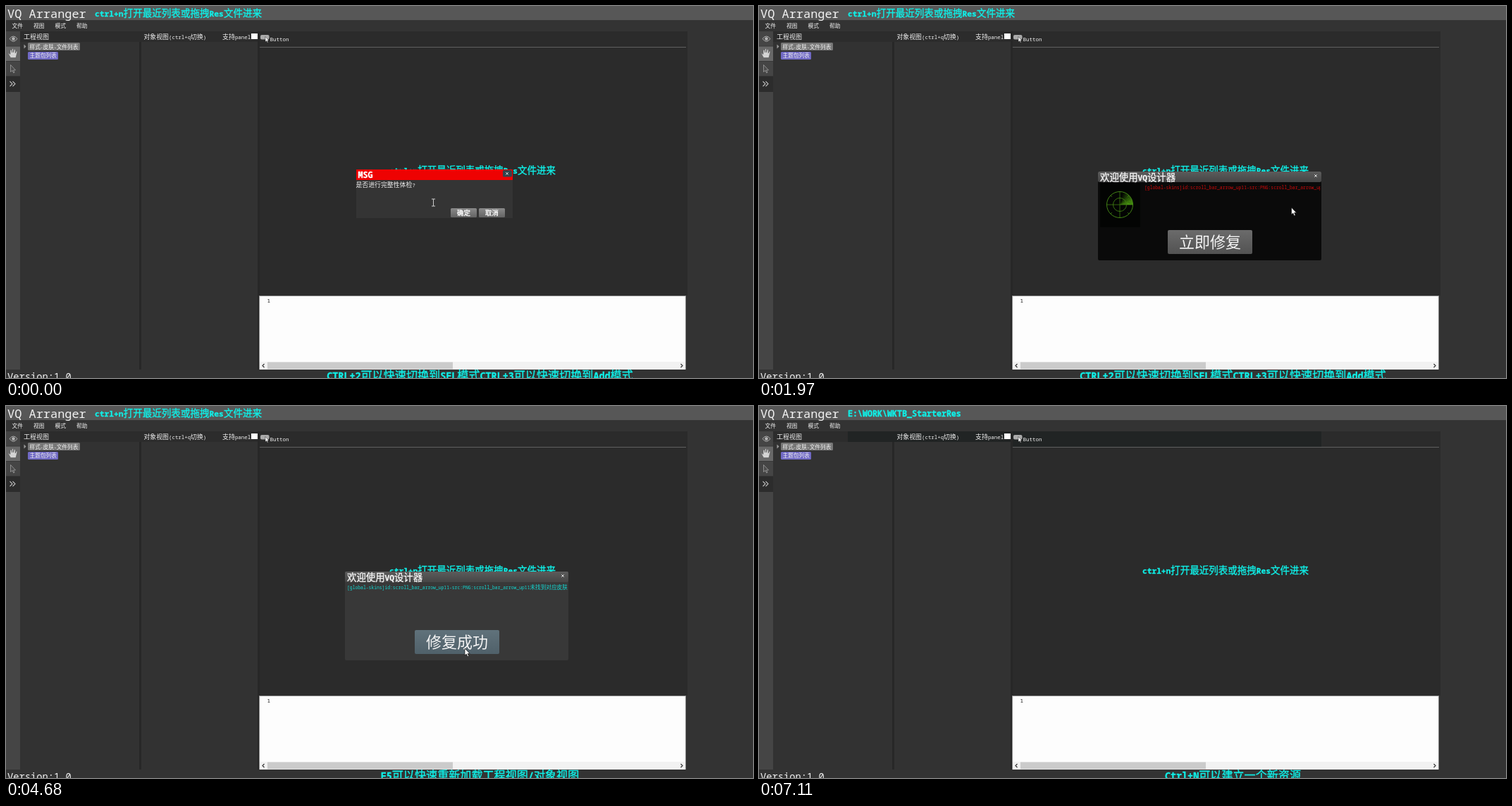
Write an HTML page that moves like this. It is 1060 px wide and 528 px high and loops after 7700 ms.

```html
<!DOCTYPE html>
<html lang="zh-CN">
<head>
<meta charset="utf-8">
<title>Health check</title>
<style>
html, body { margin: 0; width: 100%; height: 100%; overflow: hidden; background: #333; }
svg { display: block; width: 1060px; height: 528px; }
text { font-family: "Noto Sans CJK SC", "Noto Sans CJK", sans-serif; white-space: pre; }
.m { font-family: "Noto Sans Mono", "Liberation Mono", monospace; }
.l { font-weight: 300; }
.mid { text-anchor: middle; }
.b { stroke-width: .35px; }
.b .m { font-weight: 600; }
</style>
</head>
<body>
<svg id="stage" viewBox="0 0 1060 528"></svg>
<script>
const LOOP = 7700;
const STEP = 134;   // screen refresh interval
const LEAD = 40;    // refresh phase
const SPIN = 0.305; // radar, degrees per ms
const CYAN = '#0ff0e8';

// Full-width glyphs take one em, half-width ones half an em.
const runs = s => s.replace(/[\x20-\x7e]+|[^\x20-\x7e]+/g, r =>
  r.charCodeAt(0) < 127 ? `<tspan class="m" font-size=".8333em">${r}</tspan>` : r);
const text = (x, y, size, s, fill = '#f2f2f2', cls = '', id = '') =>
  `<text x="${x}" y="${y}" font-size="${size}" fill="${fill}" class="${cls}" id="${id}"` +
  `${/\bb\b/.test(cls) ? ` stroke="${fill}"` : ''}>${runs(s)}</text>`;
const rect = (x, y, w, h, fill, attrs = '') =>
  `<rect x="${x}" y="${y}" width="${w}" height="${h}" fill="${fill}" ${attrs}/>`;
const line = (d, stroke, width = 1) =>
  `<path d="${d}" fill="none" stroke="${stroke}" stroke-width="${width}"/>`;
const group = (id, body) => `<g id="${id}">${body}</g>`;
const grad = (id, a, b) =>
  `<linearGradient id="${id}" x2="0" y2="1"><stop stop-color="${a}"/><stop offset="1" stop-color="${b}"/></linearGradient>`;

const defs = '<defs>' +
  grad('head', '#5c5c5c', '#454545') +
  grad('normal', '#6b6b6b', '#525252') + grad('hover', '#918f90', '#a2a0a1') +
  grad('done', '#60727b', '#50616a') + grad('press', '#71858f', '#60737d') +
  grad('small', '#8a8a8a', '#646464') + grad('smallHover', '#aaa', '#888') +
  '<clipPath id="log"><rect x="482" y="250" width="314.5" height="14"/></clipPath></defs>';

const toolbar =
  rect(0, 36, 20, 480, '#454545') + rect(0, 57, 20, 21, '#686868') +
  rect(0, 100, 20, 22, '#2c2c2c') + line('M0 57H20M0 78.5H20M0 99.5H20', '#383838') +
  line('M5 46.5Q10.5 39.5 16 46.5Q10.5 54 5 46.5Z', '#b4b4b4') +
  '<circle cx="10.5" cy="46.5" r="2.3" fill="#b4b4b4"/>' +
  '<path d="M6.5 73.5L3.5 68Q4 66.5 6 68.5V62.5Q7 61.5 8 62.5L8.6 66V61Q9.6 60 10.5 61V66L11.7 61.5Q13 61 13.3 62.2L13.2 67L14.6 64Q16 63.5 16 65L14 73.5Z" fill="#d4d4d4" stroke="#444" stroke-width=".5"/>' +
  '<path d="M6.5 83.5V93.5L9 91.5L10.7 95L12 94.3L10.5 91H13.5Z" fill="#4c4c4c" stroke="#a0a0a0" stroke-width=".8"/>' +
  line('M5.5 107L9 110.5L5.5 114M9.5 107L13 110.5L9.5 114', '#bbb', 1.1);

const hint = 'ctrl+n打开最近列表或拖拽Res文件进来';
const frame =
  rect(0, 0, 1060, 528, '#333') + rect(0, 0, 1060, 20, '#575757') +
  text(2, 17, 20.35, 'VQ Arranger') +
  ['文件', '视图', '模式', '帮助'].map((s, i) => text(8.5 + i * 30.5, 30.7, 7.8, s)).join('') +
  toolbar +
  rect(20, 36, 947, 480, '#323232') + rect(20, 36, 337, 15, '#2c2c2c') +
  rect(189, 51, 3, 465, '#272727') +
  rect(357, 36, 3, 480, '#272727') + rect(360, 36, 607, 375, '#2b2b2b') +
  group('shade', rect(126, 36, 231, 15, '#212424') + rect(360, 36, 438, 22, '#212424')) +
  rect(360, 58, 605, 1, '#606060') +
  text(25, 46.7, 9, '工程视图') + text(195.5, 46.7, 8.9, '对象视图(ctrl+q切换)') +
  text(307, 46.7, 8.95, '支持panel') +
  rect(348, 39, 9, 8, '#fff') +
  rect(361, 41, 12.5, 6.5, '#aaa', 'rx="2"') +
  '<path d="M368 43.5V51L369.7 49.5L371 52L372 51.5L371 49H373Z" fill="#fff" stroke="#222" stroke-width=".5"/>' +
  text(374.5, 50, 9, 'Button') +
  '<path d="M25.5 54.5L28.5 57.5L25.5 60.5Z" fill="#999"/>' +
  rect(31, 52, 74, 11, '#777', 'rx="1.5"') + text(33.5, 60.5, 7.65, '样式-皮肤-文件列表') +
  rect(31, 65, 43, 11, '#7069c4', 'rx="1.5"') + text(33.5, 73.2, 7.7, '主题包列表') +
  rect(359, 411, 606, 105, '#8c8c8c') + rect(360, 412, 604, 104, '#fdfdfd') +
  text(370.5, 420.7, 9.2, '1', '#111') +
  rect(360, 505, 604, 11, '#f2f2f2') + rect(371, 505.5, 263, 9.8, '#cbcbcb') +
  line('M366.5 508L364 510.5L366.5 513M957.5 508L960 510.5L957.5 513', '#333', 1.2) +
  text(2, 530.5, 16.5, 'Version:1.0') +
  text(662, 238.3, 13.5, hint, CYAN, 'b mid') +
  text(126, 15, 13.55, hint, CYAN, 'b', 'hint') +
  text(126, 15, 14, 'E:\\WORK\\WKTB_StarterRes', CYAN, 'b', 'path') +
  ['CTRL+2可以快速切换到SEL模式CTRL+3可以快速切换到Add模式',
   'F5可以快速重新加载工程视图/对象视图',
   'Ctrl+N可以建立一个新资源'].map((s, i) => text(672.5, 530, 16.1, s, CYAN, 'b mid', 'tip' + i)).join('');

const cross = (x, y) => line(`M${x - 1.7} ${y - 1.7}l3.4 3.4m0 -3.4l-3.4 3.4`, '#e8e8e8');
const smallButton = (id, x, s) =>
  rect(x, 287, 37, 13, 'url(#small)', `rx="1.5" id="${id}"`) +
  text(x + 18.5, 297, 9.4, s, '#fff', 'b mid');
const msg =
  rect(497, 232, 222, 69, '#343434') + rect(497, 232, 222, 15, '#ee0202') +
  text(499.5, 244, 14, 'MSG', '#fff', 'b') +
  rect(705, 233, 13, 9.5, '#34444c', 'rx="1.5"') + cross(711, 237.8) +
  text(496.5, 257, 8.9, '是否进行完整性体检?') +
  smallButton('ok', 631, '确定') + smallButton('cancel', 671, '取消');

const dialog = (w, h, body, content) =>
  rect(481, 235, w, h, body, 'rx="2"') + rect(481, 235, w, 15, 'url(#head)', 'rx="2"') +
  text(484, 247.5, 13.4, '欢迎使用VQ设计器', '#f4f4f4', 'b') +
  cross(473 + w, 241) + content;
const button = (id, x, y, s) =>
  rect(x, y, 120, 34, 'url(#normal)', `rx="2" id="${id}"`) +
  text(x + 60, y + 25.2, 22, s, '#f4f4f4', 'l mid');

// Sweep: thin slices fading away behind the leading edge.
const polar = (r, deg) => {
  const a = deg * Math.PI / 180;
  return `${(r * Math.cos(a)).toFixed(2)} ${(r * Math.sin(a)).toFixed(2)}`;
};
const slices = Array.from({ length: 15 }, (_, i) =>
  `<path d="M0 0L${polar(18.5, -5 * i - 5.3)}A18.5 18.5 0 0 1 ${polar(18.5, -5 * i)}Z" fill="#58b414" opacity="${0.85 * (1 - i / 15)}"/>`).join('');
const ring = (r, stroke) => `<circle r="${r}" fill="none" stroke="${stroke}" stroke-width=".9"/>`;
const radar = rect(484, 251, 57, 63, '#030403') +
  '<g transform="translate(512 282)">' + group('sweep', slices) +
  line('M-18.5 0H18.5M0 -18.5V18.5', '#3f7d12', .8) +
  line('M-13 -13l2 2M13 -13l-2 2M-13 13l2 -2M13 13l-2 -2', '#3f7d12', .8) +
  ring(18.5, '#4a9118') + ring(9.5, '#3f7d12') + '</g>';

const issue = '[global-skins]id:scroll_bar_arrow_up11-src:PNG:scroll_bar_arrow_up11未找到对应皮肤';
const log = (x, fill) => `<g clip-path="url(#log)">${text(x, 259.7, 7.64, issue, fill)}</g>`;

document.getElementById('stage').innerHTML = defs + frame +
  group('msg', msg) +
  group('welcome', dialog(254, 63, '#383838', button('check', 548, 255, '立即体检'))) +
  group('scan', dialog(317, 126, '#0a0a0a', radar + log(547, '#d00808') + button('repair', 580, 318, '立即修复'))) +
  group('fixed', dialog(317, 126, '#383838', log(484, '#12d8d2') + button('success', 580, 318, '修复成功'))) +
  group('beam', line('M-2.5 -5H2.5M0 -5V5M-2.5 5H2.5', '#ccc')) +
  group('arrow', '<path d="M0 0V10L2.3 8L4 11.8L5.7 11L4.1 7.4H7.2Z" fill="#fff" stroke="#111" stroke-width=".7"/>');

const el = id => document.getElementById(id);
const fill = (id, paint) => el(id).setAttribute('fill', `url(#${paint})`);

// When each part is on screen.
const spans = {
  msg: [0, 640], welcome: [640, 1460], scan: [1460, 4560], fixed: [4560, 6290],
  hint: [0, 6290], path: [6290, LOOP], shade: [6290, LOOP],
  tip0: [0, 3200], tip1: [3200, 7110], tip2: [7110, LOOP],
  beam: [0, 270], arrow: [270, 7110]
};

// Mouse moves: start, duration, destination.
const home = [606.5, 279];
const moves = [
  [150, 240, 658, 293],   // confirm
  [940, 360, 619, 276],   // check
  [1460, 480, 755.5, 286],
  [1970, 430, 844, 286],
  [2520, 620, 645, 339],  // repair
  [3600, 340, 697, 316],
  [3960, 150, 684.5, 316],
  [4140, 260, 651, 344],
  [4700, 340, 770, 322],
  [5070, 230, 651, 346],  // done
  [6440, 400, 744, 242],
  [6840, 90, 670, 399]
];
const ease = p => p * p * (3 - 2 * p);
const pointer = t => moves.reduce(([x, y], [start, len, tx, ty]) => {
  const p = ease(Math.min(1, Math.max(0, (t - start) / len)));
  return [x + (tx - x) * p, y + (ty - y) * p];
}, home);

function render(time) {
  const t = Math.floor((time + LEAD) / STEP) * STEP - LEAD;
  const [x, y] = pointer(t);
  const over = (left, top, w, h) => x >= left && x <= left + w && y >= top && y <= top + h;

  for (const [id, [from, to]] of Object.entries(spans))
    el(id).style.display = time >= from && time < to ? '' : 'none';

  const onMain = over(580, 318, 120, 34);
  fill('ok', over(631, 287, 37, 13) ? 'smallHover' : 'small');
  fill('check', over(548, 255, 120, 34) ? 'hover' : 'normal');
  fill('repair', onMain ? 'hover' : 'normal');
  fill('success', time >= 5890 ? 'press' : onMain ? 'done' : 'normal');

  el('sweep').setAttribute('transform', `rotate(${(t - 1970) * SPIN})`);
  for (const id of ['beam', 'arrow']) el(id).setAttribute('transform', `translate(${x} ${y})`);
}

const start = performance.now();
function loop() {
  render((performance.now() - start) % LOOP);
  requestAnimationFrame(loop);
}
render(0);
requestAnimationFrame(loop);
</script>
</body>
</html>
```
